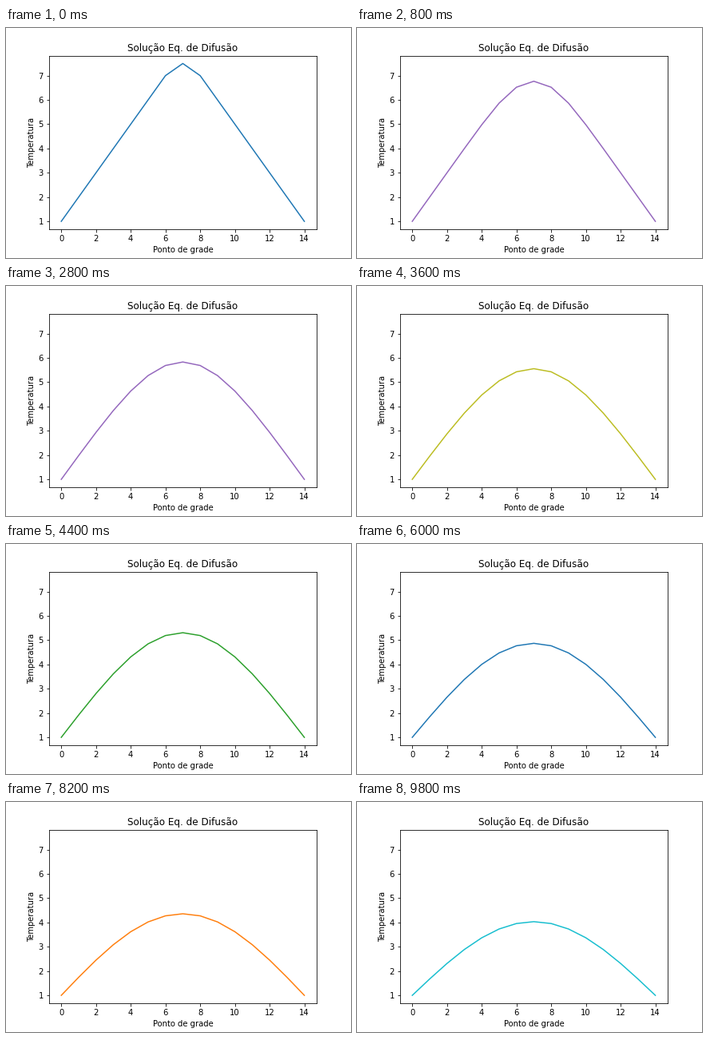
Write a matplotlib script that moves like this. It is 432 px wide and 288 px high and loops after 10 s.

```python
import numpy as np
import matplotlib.pyplot as plt
from matplotlib.animation import FuncAnimation

plt.rcParams.update({"font.family": "DejaVu Sans", "font.size": 10})

FRAMES = 50
STEP_MS = 200
RATE = 0.25  # diffusion number of the explicit scheme

x = np.arange(15)


def diffuse(temp):
    """Advance one time step with fixed end values."""
    new = temp.copy()
    new[1:-1] += RATE * (temp[2:] - 2 * temp[1:-1] + temp[:-2])
    return new


def solve(steps):
    temp = 8.0 - np.abs(x - 7)
    rows = []
    for _ in range(steps):
        temp = diffuse(temp)
        rows.append(temp)
    return rows


profiles = solve(FRAMES)

fig, ax = plt.subplots(figsize=(6, 4), dpi=72, facecolor="white")
fig.subplots_adjust(left=0.125, right=0.9, bottom=0.125, top=0.88)
ax.set_title("Solução Eq. de Difusão")
ax.set_xlabel("Ponto de grade")
ax.set_ylabel("Temperatura")
ax.set_xlim(-0.7, 14.7)
ax.set_ylim(0.675, 7.825)
ax.set_xticks(range(0, 15, 2))
ax.set_yticks(range(1, 8))
line, = ax.plot(x, profiles[0], lw=1.5)


def update(i):
    line.set_ydata(profiles[i])
    line.set_color(f"C{i % 10}")
    return line,


def init():
    return update(0)


anim = FuncAnimation(fig, update, frames=FRAMES, init_func=init,
                     interval=STEP_MS, repeat=True, repeat_delay=0)
plt.show()
```
